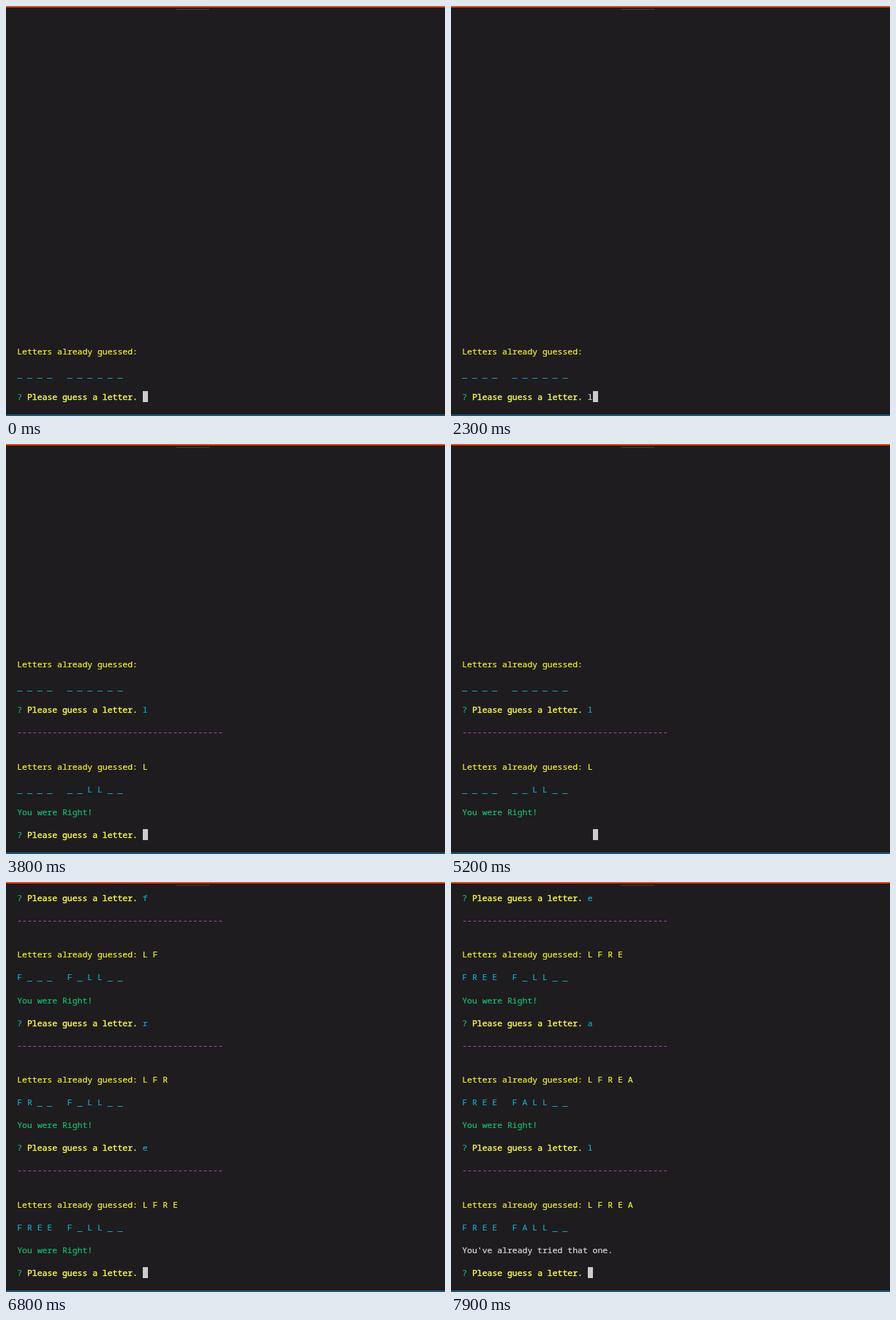
These frames come from a looping animation (600x560 px, 8 s). An HTML page:

```html
<!DOCTYPE html>
<html lang="en">
<head>
<meta charset="utf-8">
<title>Word guessing game</title>
<style>
  html, body { margin: 0; width: 100%; height: 100%; overflow: hidden; background: #1e1c1e; }
  #stage { position: absolute; left: 0; top: 0; width: 600px; height: 560px; overflow: hidden; background: #1e1c1e; }
  #log {
    position: absolute; left: 15.2px; bottom: 18.6px; margin: 0;
    font: 11.45px/15.515px "Noto Sans Mono", "DejaVu Sans Mono", monospace;
    white-space: pre; color: #dcdcdc;
    -webkit-text-stroke: 0.2px;
  }
  .bar { position: absolute; left: 0; width: 600px; height: 2px; }
  #top { top: 0; background: #e64a19; }
  #tab { top: 4px; left: 232px; width: 46px; height: 1px; background: #3b4143; }
  #foot { bottom: 0; background: linear-gradient(#1b6d9c 50%, #1e4258 50%); }
  .y { color: #f4f434; }
  .b { color: #fbfb52; -webkit-text-stroke-width: 0.4px; }
  .c { color: #14a9d0; }
  .g { color: #18bc70; }
  .m { color: #bc3fbc; position: relative; top: -1px; }
  .cur { background: #cccccc; }
</style>
</head>
<body>
<div id="stage">
  <pre id="log"></pre>
  <div class="bar" id="top"></div>
  <div class="bar" id="tab"></div>
  <div class="bar" id="foot"></div>
</div>
<script>
const LOOP = 8000;
const WORD = "FREE FALL__";
// key, time typed, time the prompt clears, time the reply shows
const TURNS = [
  ["l", 2300, 2500, 2600],
  ["f", 4900, 5200, 5300],
  ["r", 5500, 5600, 5700],
  ["e", 5900, 6100, 6200],
  ["a", 7000, 7200, 7300],
  ["l", 7600, 7900, 7900]
];
const BLINKS = [[400, 800], [1600, 2000], [3300, 3700]];

const log = document.getElementById("log");
const paint = (cls, text) => `<span class="${cls}">${text}</span>`;
const prompt = paint("g", "?") + " " + paint("b", "Please guess a letter.") + " ";
const rule = paint("m", "-".repeat(41));

function status(guessed, msg) {
  const word = [...WORD].map(c => c === " " || guessed.includes(c) ? c : "_").join(" ");
  const list = ["Letters already guessed:", ...guessed].join(" ");
  const rows = [paint("y", list), "", paint("c", word), ""];
  return msg ? [...rows, msg, ""] : rows;
}

function screen(t) {
  const guessed = [];
  let rows = status(guessed, "");
  let line = prompt;
  for (const [key, typed, clear, shown] of TURNS) {
    if (t < typed) break;
    if (t < shown) {
      line = t < clear ? prompt + key : " ".repeat(26);
      break;
    }
    const letter = key.toUpperCase();
    const again = guessed.includes(letter);
    if (!again) guessed.push(letter);
    const msg = again ? "You've already tried that one." : paint("g", "You were Right!");
    rows = [...rows, prompt + paint("c", key), "", rule, "", "", ...status(guessed, msg)];
  }
  const off = BLINKS.some(([a, b]) => t >= a && t < b);
  return [...rows, line + (off ? " " : paint("cur", " "))].join("\n");
}

let last = "";
const start = performance.now();
function draw(now) {
  const html = screen(Math.max(0, now - start) % LOOP);
  if (html !== last) log.innerHTML = last = html;
  requestAnimationFrame(draw);
}
draw(start);
</script>
</body>
</html>
```
